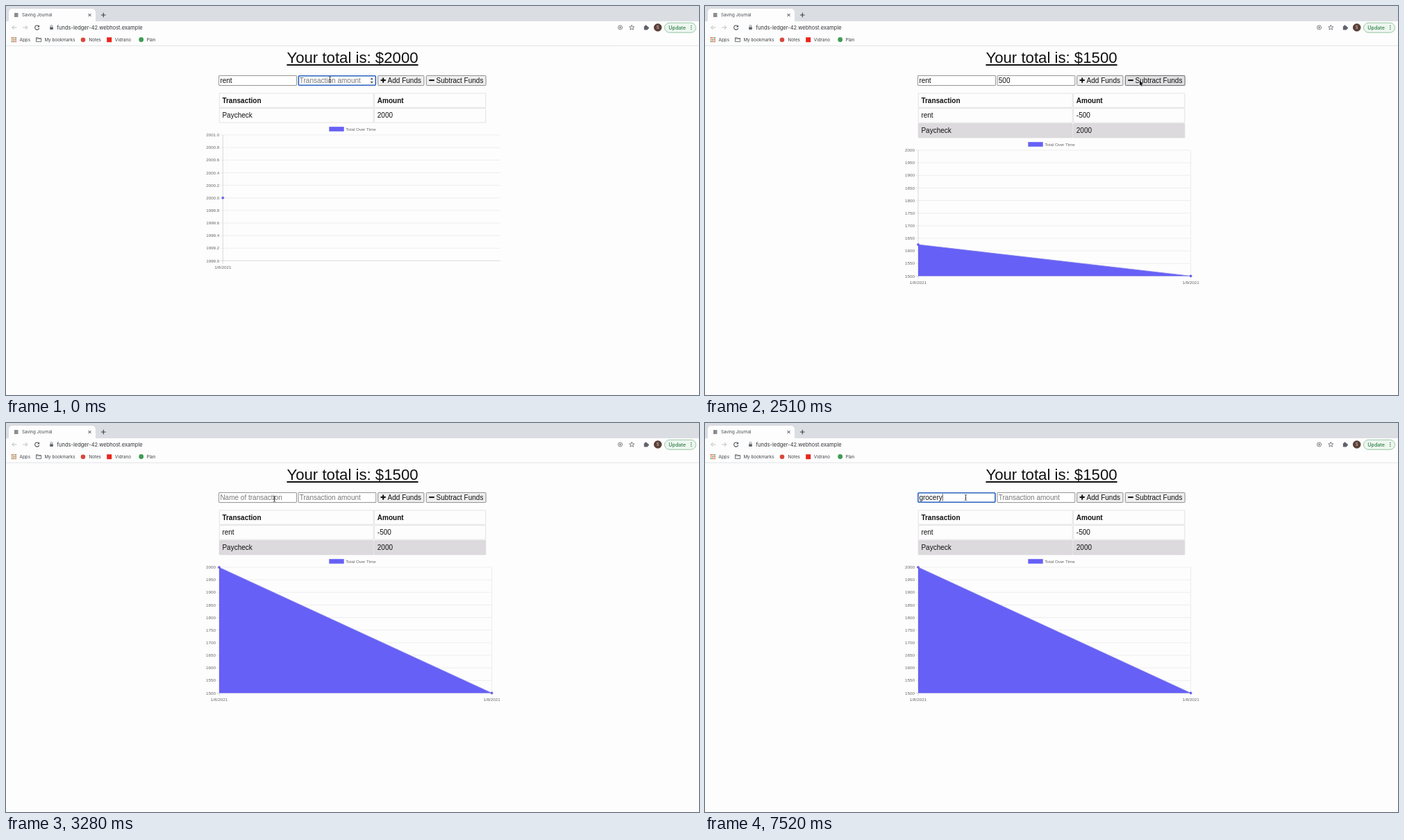
Animation of 998 by 561 pixels, one loop 8000 ms. Source, as an HTML page with a canvas:

```html
<!DOCTYPE html>
<html lang="en">
<head>
<meta charset="utf-8">
<title>Saving Journal</title>
<style>
  html, body { margin: 0; width: 100%; height: 100%; overflow: hidden; background: #fdfdfd; }
  canvas { display: block; position: absolute; left: 0; top: 0; }
  h1 {
    position: absolute; left: 0; top: 62px; width: 998px; margin: 0; text-align: center;
    font: 22.2px/25px "Liberation Sans", sans-serif; color: #111; text-decoration: underline;
  }
</style>
</head>
<body>
<canvas id="stage" width="998" height="561"></canvas>
<h1 id="total"></h1>
<script>
const ctx = document.getElementById('stage').getContext('2d');
const total = document.getElementById('total');

const LOOP = 8000;
const SANS = '"Liberation Sans", sans-serif';
const UI = 'Inter, sans-serif';
const PURPLE = '#6660f6';
const ICON = '#5f6368';

// Moments of the interaction, in ms
const MOVE_START = 1280, MOVE_END = 3650, MOVE_STEP = 94.8;
const PRESS = 2320, SUBMIT = 2443, CLEARED = 2600;

// [start, text, caret visible]
const AMOUNT = [[0, '', 0], [190, '5', 1], [590, '50', 1], [790, '500', 1], [1280, '500', 0],
  [1790, '500', 1], [PRESS, '500', 0], [CLEARED, '', 0]];
const NAME = [[0, 'rent', 0], [CLEARED, '', 0], [MOVE_END, '', 1], [4250, '', 0], [4650, '', 1],
  [5240, '', 0], [5340, 'g', 1], [5640, 'gr', 1], [5930, 'gro', 1], [6530, 'gro', 0],
  [6830, 'groc', 1], [7030, 'groce', 1], [7230, 'grocer', 1], [7520, 'grocery', 1]];

const current = (list, t) => list.filter(entry => entry[0] <= t).pop();
const clamp = v => Math.min(1, Math.max(0, v));
const easeOut = (t, power) => 1 - (1 - clamp(t)) ** power;
const mix = (a, b, p) => a + (b - a) * p;

function text(str, x, y, size, color = '#111', { font = SANS, weight = 400, align = 'left' } = {}) {
  ctx.font = `${weight} ${size}px ${font}`;
  ctx.textAlign = align;
  ctx.fillStyle = color;
  ctx.fillText(str, x, y);
}

function rect(x, y, w, h, fill, stroke, width = 0.8, radius = 0) {
  ctx.beginPath();
  ctx.roundRect(x, y, w, h, radius);
  if (fill) { ctx.fillStyle = fill; ctx.fill(); }
  if (stroke) { ctx.strokeStyle = stroke; ctx.lineWidth = width; ctx.stroke(); }
}

function circle(x, y, r, fill, stroke, width = 0.8) {
  rect(x - r, y - r, 2 * r, 2 * r, fill, stroke, width, r);
}

function path(d, x, y, stroke, width = 1, fill) {
  const shape = new Path2D(d);
  ctx.save();
  ctx.translate(x, y);
  if (stroke) { ctx.strokeStyle = stroke; ctx.lineWidth = width; ctx.stroke(shape); }
  if (fill) { ctx.fillStyle = fill; ctx.fill(shape); }
  ctx.restore();
}

const line = (x1, y1, x2, y2, color, width = 0.8) =>
  path(`M${x1} ${y1}L${x2} ${y2}`, 0, 0, color, width);

function drawBrowser() {
  const ui = { font: UI };
  rect(0, 0, 998, 22, '#dadde2');
  rect(4, 4, 125, 24, '#fdfdfd', null, 0, 5);
  rect(0, 22, 998, 35, '#fdfdfd');
  line(0, 57.3, 998, 57.3, '#dcdee1');

  rect(12, 10, 5.5, 6, '#8a8d91');
  text('Saving Journal', 23, 15.2, 6.2, '#45484c', ui);
  path('M-2-2L2 2M2-2L-2 2', 120.5, 13, '#3c4043');
  path('M-3.3 0H3.3M0-3.3V3.3', 140.3, 13, '#3c4043', 1.1);

  path('M3.5 0H-3M0-3L-3 0L0 3', 11.7, 31, '#b4b7bb', 0.9);
  path('M-3.5 0H3M0-3L3 0L0 3', 27.8, 31, '#b4b7bb', 0.9);
  path('M2.6-1.7A3.1 3.1 0 1 0 3 1', 44.7, 31, '#505357', 1.1);
  path('M3.4-3.6V-.4H.2Z', 44.7, 31, null, 0, '#505357');
  rect(63.2, 30.2, 4.6, 3.8, ICON, null, 0, 0.5);
  path('M-1.4 0V-1.2A1.4 1.4 0 0 1 1.4-1.2V0', 65.5, 30.2, ICON, 0.7);
  text('funds-ledger-42.webhost.example', 73.3, 33.7, 7.5, '#303236', ui);

  circle(884.5, 31, 3, null, ICON);
  path('M-1.6 0H1.6M0-1.6V1.6', 884.5, 31, ICON, 0.8);
  path('M0-3.6L1-1.1L3.6-1L1.6.7L2.3 3.2L0 1.8L-2.3 3.2L-1.6.7L-3.6-1L-1-1.1Z', 901.2, 31, ICON, 0.8);
  rect(918.8, 29, 5.6, 5.4, ICON, null, 0, 0.7);
  circle(921.5, 28.7, 1.3, ICON);
  circle(924.7, 31.6, 1.3, ICON);
  circle(938.7, 31, 5.8, '#5b4038');
  text('S', 938.7, 33.1, 5.8, '#eee', { font: UI, align: 'center' });
  rect(948.5, 24.3, 45, 14, '#edf6ef', '#8fc29d', 0.9, 7);
  text('Update', 954.3, 33.6, 7.1, '#2b7d46', { font: UI, weight: 500 });
  for (const dy of [-2.5, 0, 2.5]) circle(986.8, 31 + dy, 0.75, '#2b7d46');

  const dots = ['#d9534a', '#dd7a3c', '#4d9d5c'];
  for (let i = 0; i < 9; i++)
    rect(7.8 + i % 3 * 2.7, 45 + Math.floor(i / 3) * 2.7, 1.8, 1.8, dots[(i + Math.floor(i / 3)) % 3]);
  path('M-3.6-2.8H-.8L.2-1.8H3.6V2.9H-3.6ZM-3.6-1.4H3.6', 47.1, 48.5, ICON, 0.9);
  circle(111, 48.7, 3.3, '#d9473b');
  rect(145.2, 45.2, 7, 7, '#e8261c');
  circle(194.7, 48.5, 3.4, '#3f9c57');
  const bookmarks = [['Apps', 19.6], ['My bookmarks', 55.4], ['Notes', 119.4], ['Vidrano', 156.8], ['Plan', 202.4]];
  for (const [label, x] of bookmarks) text(label, x, 50.9, 6.3, '#404347', ui);
}

function drawInput(x, placeholder, [, value, caret], focused) {
  if (focused) rect(x + 0.7, 100.7, 111, 13.6, '#fff', '#2a62bd', 1.6, 1.2);
  else rect(x + 0.4, 100.4, 111.8, 14.2, '#fff', '#858585', 0.9, 0.5);
  text(value || placeholder, x + 2.2, 110.7, 10, value ? '#111' : '#777');
  if (caret) {
    const caretX = x + 2.8 + (value ? ctx.measureText(value).width : 0);
    line(caretX, 102.3, caretX, 112.5, '#222', 0.7);
  }
}

function drawButton(x, w, label, labelX, icon, hovered) {
  rect(x, 100.4, w, 14.2, hovered ? '#e0e0e2' : '#efefef', hovered ? '#555' : '#808080', 0.9, 1);
  path(icon, labelX - 6.4, 107.1, '#111', 2);
  text(label, labelX, 110.7, 10);
}

function drawTable(rows) {
  rows.forEach((row, i) => {
    const y = 125.9 + i * 21.8;
    const shaded = i === 2;
    [[307.2, 222], [530.6, 160.2]].forEach(([x, w], col) => {
      rect(x, y, w, 20.4, shaded ? '#dcdadd' : null, shaded ? '#d8d6d9' : '#dedede', 0.8);
      text(row[col], x + 4.2, y + 13.6, 10, '#111', { weight: i ? 400 : 700 });
    });
  });
}

function drawChart({ left, right, top, labels, dates, points }) {
  const height = 181.4, bottom = top + height;
  rect(465.3, top - 11.8, 21.4, 6.6, PURPLE);
  text('Total Over Time', 489.2, top - 6.2, 6.2, '#666');

  labels.forEach((label, i) => {
    const y = top + i * height / 10;
    line(left - 4, y, right, y, i === 10 ? '#cfcfcf' : '#e7e7e7', 0.7);
    text(label, left - 5, y + 2.2, 6.25, '#666', { align: 'right' });
  });
  dates.forEach((x, i) => {
    line(x, top, x, bottom + 4, i ? '#e7e7e7' : '#cfcfcf', 0.8);
    text('1/8/2021', x, bottom + 11.6, 6.25, '#666', { align: 'center' });
  });

  const dots = points.map(([x, value]) => [x, bottom - value * height]);
  if (dots.length > 1) {
    const [[x1, y1], [x2, y2]] = dots;
    path(`M${x1} ${y1}L${x2} ${y2}V${bottom}H${x1}Z`, 0, 0, null, 0, PURPLE);
    line(x1, y1, x2, y2, '#8580ee', 0.8);
  }
  for (const [x, y] of dots) circle(x, y, 1.6, PURPLE, '#5f57c8', 0.5);
}

function cursorAt(t) {
  if (t < MOVE_START) return [466.5, 106];
  if (t < 2540) {
    const p = easeOut((t - MOVE_START) / 770, 2);
    return [mix(500.5, 626, p), mix(105, 107.5, p)];
  }
  if (t < 2900) {
    const p = clamp((t - 2512) / 380);
    const eased = p * p * (3 - 2 * p);
    return [mix(626, 436, eased), mix(107.5, 118, eased)];
  }
  const p = easeOut((t - 2892) / 660, 2);
  return [mix(436, 375.5, p), mix(118, 107.5, p)];
}

function drawCursor(x, y) {
  const overInput = y > 100 && y < 115 && (x > 306 && x < 419 || x > 421 && x < 533);
  if (overInput) path('M-1.6-4Q0-4 0-3Q0-4 1.6-4M0-3V3M-1.6 4Q0 4 0 3Q0 4 1.6 4M-.9 .7H.9', x, y, '#222', 0.8);
  else path('M0 0V7.2L1.7 5.7L2.8 8.2L4 7.7L2.9 5.3H5.1Z', x, y, '#fff', 1, '#111');
}

function draw(time) {
  let t = time;
  if (t >= MOVE_START && t < MOVE_END)
    t = MOVE_START + Math.floor((t - MOVE_START + 8) / MOVE_STEP) * MOVE_STEP;

  const submitted = t >= SUBMIT;
  const [x, y] = cursorAt(t);
  const hover = (from, to) => x > from && x < to && y > 100 && y < 115;

  ctx.fillStyle = '#fdfdfd';
  ctx.fillRect(0, 0, 998, 561);
  drawBrowser();
  total.textContent = `Your total is: $${submitted ? 1500 : 2000}`;

  drawInput(306.2, 'Name of transaction', current(NAME, t), t >= MOVE_END - 1);
  drawInput(420.6, 'Transaction amount', current(AMOUNT, t), t < PRESS);
  if (t < PRESS) {
    rect(523.8, 101.9, 6, 11.2, '#f1f1f1');
    path('M-1.8-1.6L0-4L1.8-1.6ZM-1.8 1.6L0 4L1.8 1.6Z', 526.8, 107.5, null, 0, '#444');
  }
  drawButton(535.7, 66.2, 'Add Funds', 549.6, 'M-3.6 0H3.6M0-3.6V3.6', hover(535, 602));
  drawButton(605.3, 85.8, 'Subtract Funds', 619.6, 'M-4 0H3.6', hover(605, 691));

  const header = ['Transaction', 'Amount'], paycheck = ['Paycheck', '2000'];
  drawTable(submitted ? [header, ['rent', '-500'], paycheck] : [header, paycheck]);

  const ticks = (max, step, digits) =>
    Array.from({ length: 11 }, (_, i) => (max - i * step).toFixed(digits));
  drawChart(submitted
    ? { left: 307, right: 699.6, top: 208, labels: ticks(2000, 50, 0), dates: [307, 699.6],
        points: [[307, easeOut((t - SUBMIT) / 1000, 4)], [699.6, 0]] }
    : { left: 312.3, right: 712, top: 186, labels: ticks(2001, 0.2, 1), dates: [312.3],
        points: [[312.3, 0.5]] });

  drawCursor(x, y);
}

function tick() {
  draw(performance.now() % LOOP);
  requestAnimationFrame(tick);
}
tick();
</script>
</body>
</html>
```
